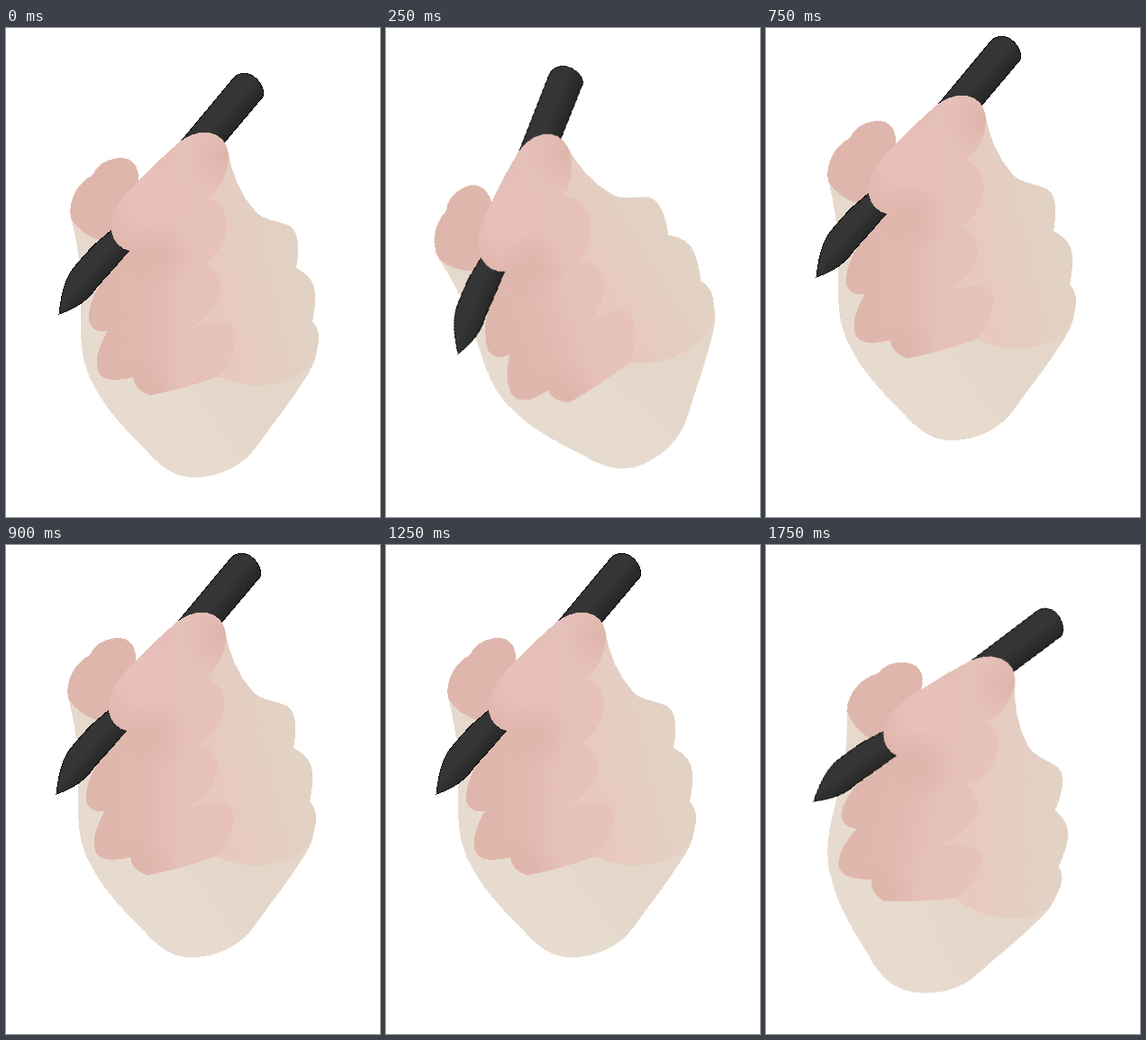
These frames come from a looping animation (415x542 px, 2 s). An HTML page:

```html
<!DOCTYPE html>
<html lang="en">
<head>
<meta charset="utf-8">
<title>Writing hand</title>
<style>
  html, body { margin: 0; width: 100%; height: 100%; overflow: hidden; background: #fff; }
  svg { display: block; width: 100%; height: 100%; shape-rendering: crispEdges; }
</style>
</head>
<body>
<svg viewBox="0 0 415 542">
  <defs>
    <linearGradient id="wrist" gradientUnits="userSpaceOnUse" x1="200" y1="435" x2="250" y2="400">
      <stop offset="0" stop-color="#e7dbcf"/>
      <stop offset="1" stop-color="#e4d6c8"/>
    </linearGradient>
    <linearGradient id="back" gradientUnits="userSpaceOnUse" x1="245" y1="320" x2="330" y2="300">
      <stop offset="0" stop-color="#e7c9c0"/>
      <stop offset="1" stop-color="#e2d2c4"/>
    </linearGradient>
    <linearGradient id="barrel" gradientUnits="userSpaceOnUse" x1="213" y1="103" x2="241" y2="127">
      <stop offset="0" stop-color="#343434"/>
      <stop offset=".45" stop-color="#363636"/>
      <stop offset="1" stop-color="#262626"/>
    </linearGradient>
    <linearGradient id="skin" gradientUnits="userSpaceOnUse" x1="100" y1="0" x2="250" y2="0">
      <stop offset="0" stop-color="#dfb6ac"/>
      <stop offset=".35" stop-color="#e0b8ae"/>
      <stop offset=".65" stop-color="#e6c1b9"/>
      <stop offset="1" stop-color="#e6c2ba"/>
    </linearGradient>
    <radialGradient id="light">
      <stop offset="0" stop-color="#e7c1ba"/>
      <stop offset=".4" stop-color="#e7c1ba"/>
      <stop offset="1" stop-color="#e7c1ba" stop-opacity="0"/>
    </radialGradient>
    <radialGradient id="shade">
      <stop offset="0" stop-color="#dfb5ab"/>
      <stop offset="1" stop-color="#dfb5ab" stop-opacity="0"/>
    </radialGradient>
    <clipPath id="fingerClip"><use href="#fingers"/></clipPath>
  </defs>

  <g id="hand">
    <!-- The pen tip is the pivot. -->
    <g transform="translate(-59 -317)">
      <path fill="url(#wrist)" d="M72 210 L150 240 L346 345 C346 362 342 372 335 384
        C317 413 297 437 281 460 C263 487 235 498 209 498 C188 498 174 488 160 473
        C138 451 113 425 101 403 C87 380 83 360 83 336 C83 300 86 262 72 210Z"/>
      <path fill="url(#back)" d="M246 135 C250 160 259 184 278 205 C290 215 310 214 318 222
        C326 232 325 250 322 266 C338 274 343 284 343 297 C343 308 342 317 340 325
        C346 333 348 339 347 348 C345 361 341 369 335 378 C310 400 265 401 236 386
        L180 380 L200 150Z"/>
      <path fill="#dfb6ac" d="M147 170 C148 150 138 143 124 144 C109 146 101 153 96 163
        C85 168 78 178 74 188 C71 197 71 204 72 211 C80 224 92 232 106 236 L130 240 L160 200Z"/>
      <path fill="url(#barrel)" stroke="#111" stroke-width="1" d="M59 317 C61 298 66 277 75 266
        C84 256 93 244 103 236 L116 225 L193 127 L253 55 C258 50 267 49 274 53 C282 59 286 66 286 75
        L243 126 L137 247 L100 288 C91 302 77 311 59 317Z"/>
      <path id="fingers" fill="url(#skin)" d="M117 225 C115 205 128 187 147 170
        C165 151 180 137 193 126 C204 117 220 113 232 118 C245 124 249 138 246 152
        C243 168 236 179 225 188 C239 193 246 206 245 222 C243 240 232 252 219 262
        C234 267 240 280 237 295 C233 311 222 322 205 333 C218 328 236 324 248 328
        C256 331 257 341 254 352 C251 367 245 378 236 386 C212 395 186 402 160 407
        C148 403 142 397 141 387 C130 390 114 392 106 386 C98 378 100 363 105 352
        C107 345 110 341 113 336 C103 338 95 334 92 325 C91 312 95 299 104 285
        L137 247 C127 245 119 237 117 225Z"/>
      <g clip-path="url(#fingerClip)">
        <circle cx="163" cy="190" r="62" fill="url(#light)"/>
        <circle cx="243" cy="142" r="46" fill="url(#shade)"/>
        <circle cx="168" cy="252" r="40" fill="url(#shade)"/>
        <circle cx="155" cy="400" r="38" fill="url(#shade)"/>
      </g>
    </g>
  </g>
</svg>
<script>
  const LOOP = 2000;
  const rest = [59, 317, 0];
  const tilted = [80, 361, -18.4];
  const raised = [56, 276, 0];
  const flat = [53, 284, 13.1];

  // start time in ms, pose as pen tip x, y and rotation
  const steps = [
    [0, rest], [250, tilted], [750, raised], [1000, flat],
    [1250, raised], [1500, rest], [1750, flat], [LOOP, rest]
  ];

  document.getElementById('hand').animate(
    steps.map(([time, [x, y, angle]]) => ({
      offset: time / LOOP,
      transform: `translate(${x}px, ${y}px) rotate(${angle}deg)`,
      easing: 'step-end'
    })),
    { duration: LOOP, iterations: Infinity }
  );
</script>
</body>
</html>
```
